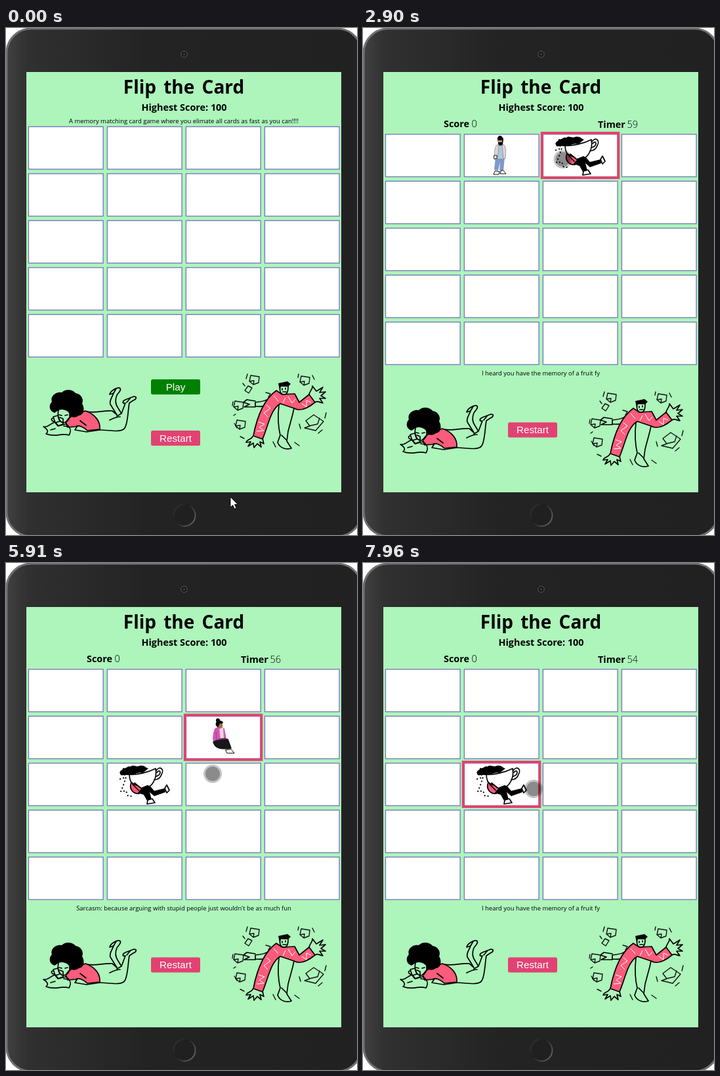
Write an HTML page that moves like this. It is 535 by 772 pixels and loops after 8 s.

```html
<!DOCTYPE html>
<html lang="en">
<head>
<meta charset="utf-8">
<title>Flip the Card</title>
<style>
html, body { margin: 0; width: 100%; height: 100%; overflow: hidden; background: #fff }
svg { display: block }
text { font-family: "Open Sans", "Noto Sans", sans-serif; font-size: 9.45px }
.mid { text-anchor: middle }
.title { font-weight: 700; font-size: 28px; word-spacing: 4px }
.bold { font-weight: 700; font-size: 14.4px }
.num { font-weight: 300; font-size: 14.6px }
.btn text { font: 15.2px "Liberation Sans", Arial, sans-serif; fill: #fff }
.ink { fill: none; stroke: #000; stroke-width: 1.7; stroke-linecap: round; stroke-linejoin: round }
.thin { fill: none; stroke: #111; stroke-width: 1; stroke-linecap: round; stroke-linejoin: round }
.pink { fill: #fb5c7b }
.white { fill: #fff }
.black { fill: #000 }
</style>
</head>
<body>
<svg width="535" height="772" viewBox="0 0 535 772">
<defs>
  <linearGradient id="body">
    <stop offset="0" stop-color="#414141"/><stop offset=".06" stop-color="#303030"/>
    <stop offset=".4" stop-color="#232323"/><stop offset="1" stop-color="#212121"/>
  </linearGradient>
  <linearGradient id="home" x2="1" y2=".7">
    <stop offset="0" stop-color="#3c3c3c"/><stop offset=".45" stop-color="#1c1c1c"/><stop offset="1" stop-color="#666"/>
  </linearGradient>

  <g id="walker">
    <path fill="#7e98cb" d="M48 36L62 36 60 56 54 56 55 43 52 56 46 55Z"/>
    <path fill="#a9cbd8" d="M51 17H60L62 38H50Z"/>
    <path fill="#d9d3dc" stroke="#8a8590" stroke-width=".7" d="M52 16C46 18 46 28 47 40L51 39 53 20ZM59 16C65 18 64 28 63 38L60 38 58 20Z"/>
    <path class="black" d="M51 8C50 3 60 2 60 9L59 16C56 20 52 18 52 14Z"/>
    <circle class="black" cx="55" cy="6" r="3"/>
    <path fill="#b98d7b" d="M52 10H58V13H52Z"/>
    <path class="thin white" d="M47 57L45 62H53L54 58ZM56 57L55 61H64L60 56ZM46 33H50V38H46Z"/>
  </g>

  <g id="bust">
    <path class="thin white" d="M41 57C42 45 43 36 48 32L55 29H62L70 33C73 40 74 49 75 57"/>
    <path class="black" d="M53 33L58 35 64 31 66 40 67 57H53Z"/>
    <path class="thin" d="M53 33C51 42 53 50 51 57M66 32C68 41 66 49 68 57M46 42L47 57M71 43L70 57"/>
    <path class="thin white" d="M49 28C46 20 49 10 57 10C65 8 70 15 68 22L66 28C62 32 56 30 55 26C52 29 51 30 49 28Z"/>
    <path class="thin" d="M54 27C57 23 52 18 59 14C61 18 66 17 67 21M62 20V24L64 24M60 27H63"/>
  </g>

  <g id="sitter">
    <path fill="#d458b4" d="M44 20C48 16 56 16 59 20L62 36 55 41 42 40C40 34 42 25 44 20Z"/>
    <path fill="#f2d3e6" d="M51 18L57 18 58 34 53 36Z"/>
    <path fill="#171717" d="M41 40C50 34 61 33 65 36L70 50 62 51 60 42 66 41 67 51 60 51C52 51 44 50 41 40Z"/>
    <path fill="#a86f4f" d="M48 11H56V18L52 20 49 18Z"/>
    <path class="black" d="M46 15C44 7 53 5 57 10L56 12 52 12 49 18Z"/>
    <circle class="black" cx="49" cy="7" r="3"/>
    <path fill="none" stroke="#a33c88" d="M46 24L47 37 63 35"/>
    <path class="thin white" d="M61 52L69 51 74 57H63Z"/>
  </g>

  <g id="mug">
    <path class="black" d="M20 17C17 12 26 11 24 8C31 10 29 5 36 6C40 2 44 7 49 5C57 3 59 8 63 9L54 16C46 13 42 20 36 17C34 21 28 17 27 20C24 17 22 22 20 17Z"/>
    <path class="ink white" d="M34 18C45 19 62 15 74 9C77 23 69 37 58 40L44 38C37 33 34 25 34 18Z"/>
    <path class="ink" d="M75 12C80 4 88 10 83 18C81 24 76 26 72 26M76 15C80 10 83 14 79 19L75 21"/>
    <path class="ink pink" d="M37 30C33 39 39 48 49 47L57 43 54 34C48 36 42 34 37 30Z"/>
    <path class="ink white" d="M42 31L52 39 62 35M39 33L48 42"/>
    <path class="black" d="M47 46C50 40 59 34 65 35L72 43 88 39 89 45 72 51 65 45 68 56 61 58 56 49Z"/>
    <path class="ink white" d="M88 39L91 34 95 42 91 46ZM62 57L69 55 73 61 61 63Z"/>
    <path fill="none" stroke="#000" stroke-width="2.2" stroke-linecap="round" stroke-dasharray="0.1 5.3" d="M20 25L29 22 25 34 21 44 29 43 32 51 39 51"/>
  </g>

  <g id="boy">
    <path fill="#bfc1bd" stroke="#333" d="M26 12L54 11 56 38 29 39Z"/>
    <path fill="#5b50cb" stroke="#333" stroke-width=".8" d="M29 16L51 15 53 33 31 34Z"/>
    <path fill="#77797a" stroke="#222" d="M56 38L69 33 77 42 77 57 61 58 60 46Z"/>
    <path fill="#333" d="M61 52H74L70 61H59Z"/>
    <path fill="#d93650" stroke="#702030" stroke-width=".8" d="M76 42L81 40 80 55H69V52H76Z"/>
    <path class="thin" d="M75 56V61M70 62L75 60 81 62"/>
    <path fill="#893737" stroke="#3e1919" d="M29 43L59 40 64 49 33 52ZM33 52H37L36 63 33 63ZM58 50H62V60H59Z"/>
    <path fill="#ddd" stroke="#333" stroke-width=".8" d="M46 42L59 39 62 43 49 46Z"/>
    <circle fill="#b48363" stroke="#30221b" cx="70" cy="21" r="17.5"/>
    <path fill="#35231e" d="M53 17C53 5 64 2 73 3C84 4 90 14 88 25L84 21 81 10C72 13 62 10 53 17Z"/>
    <path class="thin" d="M62 20V22M73 21V23M64 31C67 34 71 32 72 30M82 20C87 18 88 26 83 27"/>
  </g>
</defs>

<rect x="1" y="1" width="541" height="773" rx="37" fill="url(#body)" stroke="#707070" stroke-width="3"/>
<circle cx="271.5" cy="40" r="4.7" fill="#191919" stroke="#484848" stroke-width="1.5"/>
<circle cx="271.5" cy="40" r="1.6" fill="#444"/>
<circle cx="272" cy="742" r="16.5" fill="#202020" stroke="url(#home)" stroke-width="1.8"/>
<rect x="31" y="67" width="480" height="640" fill="#adf5bb"/>

<text class="mid title" x="271" y="100">Flip the Card</text>
<text class="mid bold" x="271.5" y="126">Highest Score: 100</text>
<text class="mid" id="intro" x="271" y="145">A memory matching card game where you elimate all cards as fast as you can!!!!</text>
<g id="stats">
  <text class="bold" x="123" y="151">Score</text><text class="num" x="165.5" y="151">0</text>
  <text class="bold" x="358" y="152">Timer</text><text class="num" id="timer" x="402.5" y="152">60</text>
</g>
<g id="grid"></g>
<text class="mid" id="msg" x="271" y="529"></text>

<g class="btn" id="play"><rect x="221" y="535" width="75" height="23" rx="2.5" fill="green"/><text class="mid" x="258.5" y="552">Play</text></g>
<g class="btn" id="restart"><rect x="221" width="75" height="23" rx="2.5" fill="#e24272"/><text class="mid" x="258.5" y="16.5">Restart</text></g>

<g id="art">
  <!-- reader on a pillow -->
  <path class="ink" d="M123 584C137 587 148 582 162 583L169 589 159 573C157 567 162 562 164 556L158 558C159 553 168 547 173 548C177 550 172 555 169 559C166 566 166 572 171 579L176 587 182 571C177 573 177 568 182 566L195 561C200 561 199 565 194 567L188 571C186 580 186 602 181 609C176 617 157 612 143 612M158 597C164 594 169 592 174 592M169 591L176 587M168 549L164 556M190 563L184 570"/>
  <path class="ink pink" d="M91 600C98 589 108 588 121 583C136 588 144 599 143 611L124 613C119 608 111 604 106 607L94 608Z"/>
  <path class="ink" d="M109 606L105 612 123 615 143 612M113 598L122 605M95 607L88 606"/>
  <path class="ink" d="M80 582C78 590 80 600 88 601C95 600 98 593 97 588M81 589L85 590M90 590L94 589"/>
  <path class="black" d="M74 586C65 583 65 574 70 569C67 560 77 553 85 555C91 548 103 551 106 556C115 557 119 566 116 572C121 580 118 590 111 590C105 595 99 592 97 590C97 583 87 579 80 582Z"/>
  <path class="ink" d="M72 592L79 590 82 599 75 601ZM72 594C67 594 70 600 74 599M82 593L87 595 87 603 79 606 75 601"/>
  <path class="ink" d="M57 607C64 609 67 602 75 600L80 606 91 603C99 608 100 613 96 620C83 616 76 624 61 618C66 614 62 610 57 607ZM68 612L75 610"/>

  <!-- runner with flying papers -->
  <path class="ink" d="M411 570C402 576 390 577 380 576L380 570C391 569 400 566 404 562M380 568L367 566 362 570 371 573 363 577 380 577M416 574C414 592 415 608 418 620L414 631C418 641 428 642 435 640L428 629 430 614 437 588 439 579M420 620L428 628"/>
  <path class="ink pink" d="M412 552L421 558 440 557 447 570 462 558 471 570C460 579 449 585 439 579L418 572C403 581 400 605 391 626L377 621C381 600 390 568 412 552Z"/>
  <path fill="none" stroke="#fff" d="M385 600L394 603 386 608 393 613 382 614M397 574L403 579 393 586 399 592M408 560L415 568M430 561L436 571 441 565M451 572L458 577 458 567 465 570M426 563L422 571"/>
  <path class="ink" d="M377 621C373 628 367 626 366 631L373 630 369 637 377 632 378 639 383 633 389 638 387 630 393 633C391 628 392 627 391 625M462 558C463 552 468 550 467 545L473 553 483 547 478 555 487 554 480 560 487 564 478 564 483 571C477 570 475 567 471 570"/>
  <path class="ink" d="M418 546C416 556 421 559 425 558C431 557 430 548 430 544M421 549V551M426 548V550M422 554H427"/>
  <path class="black" d="M415 541L429 538 434 542 430 546 418 546 417 551Z"/>
  <g class="thin" style="stroke-width:1.4">
    <path id="sheet" d="M373 529L386 531 385 540 377 543 371 538ZM377 543L378 537 371 538"/>
    <use href="#sheet" transform="translate(77 1)"/>
    <use href="#sheet" transform="translate(-24 39)"/>
    <use href="#sheet" transform="translate(-21 68)"/>
    <path d="M369 545L375 548 370 556 364 552ZM396 555L403 557 400 562M457 598L469 589 484 599 472 613 455 609 463 606ZM462 606L475 603 478 594"/>
    <path d="M368 527L366 534M467 529L470 535M445 532L446 527M361 541L364 545M346 569L345 575M350 588L347 590M348 602L352 609M357 622L363 625M447 603L449 610M488 586L486 594M476 617L482 612M407 630L411 638M440 631L447 636"/>
  </g>
</g>

<g id="shown"></g>
<rect id="ring" width="116.5" height="68" fill="none" stroke="#e24272" stroke-width="4"/>
<g id="touch"><circle r="14" opacity=".23"/><circle r="11" opacity=".29"/></g>
<path id="arrow" d="M0 0V16L3.7 12.6 6.3 18.3 9 17 6.5 11.5H11.3Z" fill="#fff" stroke="#000" stroke-width=".9"/>
</svg>
<script>
const $ = id => document.getElementById(id);
const LOOP = 8000, START = 900, HIDE = 550;
const messages = [
  "If had a dollar for every smart thing you say. I'll be poor.",
  "I heard you have the memory of a fruit fy",
  "You got this",
  "Sarcasm: because arguing with stupid people just wouldn't be as much fun"
];
// time, cell, picture, message
const clicks = [
  [1800, 1, "walker", 0], [2700, 2, "mug", 1], [3450, 5, "bust", 1],
  [3950, 6, "sitter", 1], [5100, 9, "mug", 2], [5620, 6, "sitter", 3],
  [6180, 10, "boy", 0], [6800, 2, "mug", 2], [7750, 9, "mug", 1]
];
// time, x, y of the pointer
const path = [
  [70, 342, 714], [760, 264, 552], [860, 264, 552], [930, 267, 535], [1050, 267, 535],
  [1700, 250, 208], [2090, 252, 203], [2400, 252, 203], [2680, 300, 200], [2950, 305, 200],
  [3420, 240, 268], [3550, 242, 270], [3720, 294, 274], [3960, 300, 274], [4500, 245, 334],
  [5120, 245, 334], [5560, 320, 268], [5700, 320, 268], [5910, 315, 321], [6250, 315, 330],
  [6760, 345, 202], [6900, 347, 202], [7200, 407, 254], [7300, 407, 254], [7700, 252, 338],
  [7890, 254, 339], [7960, 260, 344]
];

const cellX = n => 34 + n % 4 * 120;
const cellY = n => 161.5 + Math.floor(n / 4) * 71.5;
const move = (el, x, y) => el.setAttribute("transform", `translate(${x} ${y})`);
const show = (el, on) => el.style.display = on ? "" : "none";

for (let n = 0; n < 20; n++)
  $("grid").innerHTML += `<rect x="${cellX(n) + .4}" y="${cellY(n) + .3}" width="113.7" height="64.7" fill="#fff" stroke="#7b7cbc" stroke-width="1.4"/>`;
$("shown").innerHTML = clicks.map(([, n, pic]) =>
  `<use href="#${pic}" x="${cellX(n)}" y="${cellY(n) - .5}"/>`).join("");
const pictures = [...$("shown").children];

function pointer(t) {
  const i = path.findIndex(p => p[0] > t);
  if (i < 0) return path.at(-1).slice(1);
  if (!i) return path[0].slice(1);
  const [t0, x0, y0] = path[i - 1], [t1, x1, y1] = path[i];
  const k = (t - t0) / (t1 - t0), e = k * k * (3 - 2 * k);
  return [x0 + (x1 - x0) * e, y0 + (y1 - y0) * e];
}

function draw(t) {
  const playing = t >= START;
  const last = clicks.findLast(c => c[0] <= t);
  show($("intro"), !playing);
  show($("play"), !playing);
  show($("stats"), playing);
  move($("grid"), 0, playing ? 0 : -11.5);
  move($("restart"), 0, last ? 600.5 : playing ? 585.5 : 613);
  move($("art"), 0, last ? 27 : playing ? 12 : 0);
  $("timer").textContent = 60 - Math.max(0, Math.floor(t / 1000) - 1);
  $("msg").textContent = last ? messages[last[3]] : "";

  // cards open in pairs and close shortly after the second one
  pictures.forEach((pic, i) => {
    const second = clicks[i | 1];
    show(pic, t >= clicks[i][0] && (!second || t < second[0] + HIDE));
  });
  show($("ring"), last);
  if (last) move($("ring"), cellX(last[1]) - 1.2, cellY(last[1]) - 1.5);

  const [x, y] = pointer(t), onScreen = y < 707;
  show($("touch"), onScreen);
  show($("arrow"), !onScreen);
  move(onScreen ? $("touch") : $("arrow"), x, y);
}

function tick() {
  draw(performance.now() % LOOP);
  requestAnimationFrame(tick);
}
tick();
</script>
</body>
</html>
```
